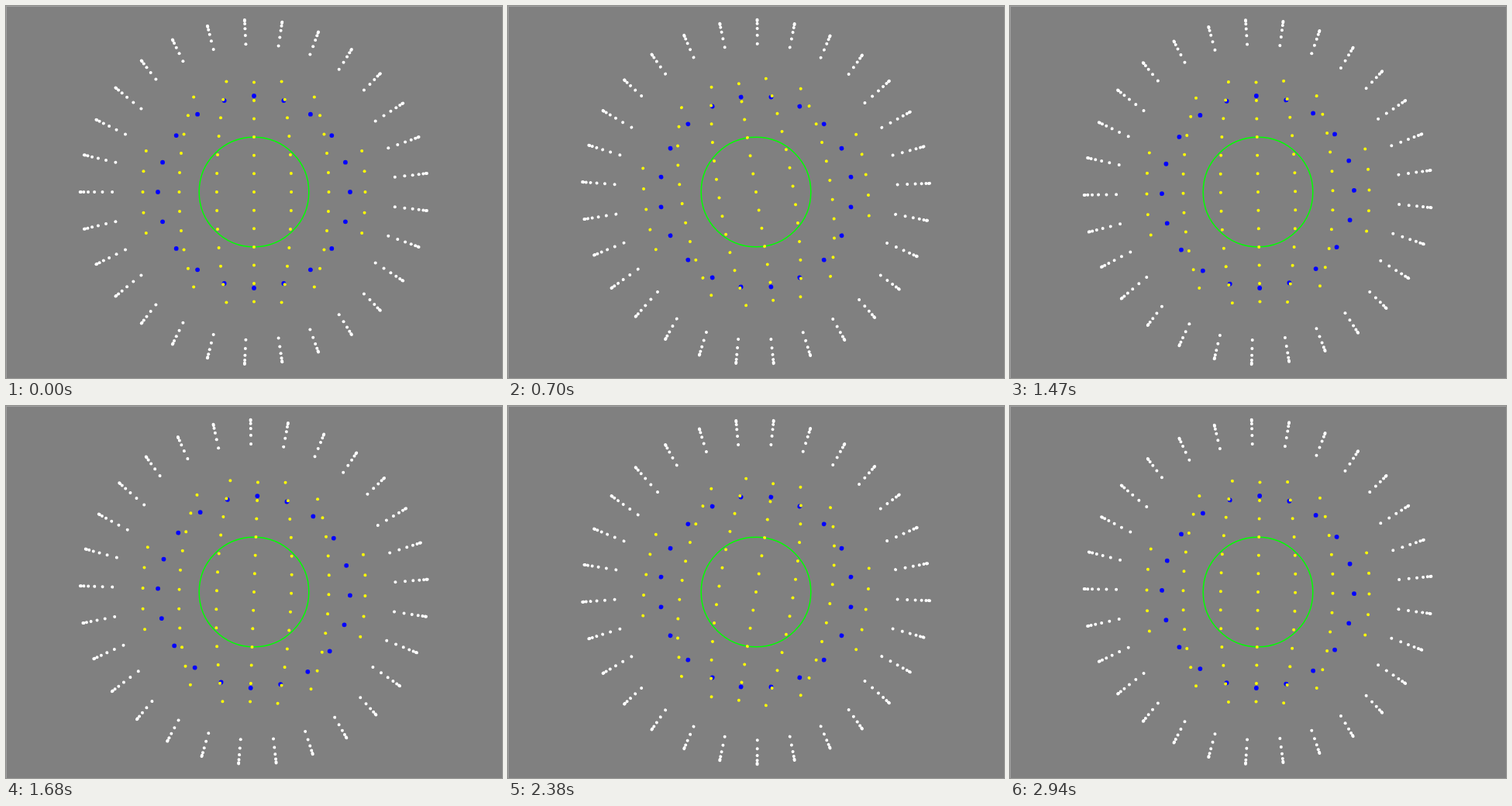
Animation of 640 by 480 pixels, one loop 3.01 s. Source, as an HTML page with a canvas:

```html
<!DOCTYPE html>
<html lang="en">
<head>
<meta charset="utf-8">
<title>Rocking dot field</title>
<style>
html, body { margin: 0; width: 100%; height: 100%; overflow: hidden; background: #808080; }
canvas { display: block; }
</style>
</head>
<body>
<canvas id="stage" width="640" height="480"></canvas>
<script>
const ctx = document.getElementById('stage').getContext('2d');
const TAU = Math.PI * 2;
const STEP = 70, STEPS = 43;

const dot = (x, y, r) => {
  ctx.beginPath();
  ctx.arc(x, y, r, 0, TAU);
  ctx.fill();
};

// Outer spokes: dots crowd together towards the rim; flat spokes have one more.
function spokes() {
  ctx.fillStyle = '#fff';
  for (let k = 0; k < 29; k++) {
    const a = Math.PI - k * TAU / 29;
    const c = Math.cos(a), s = Math.sin(a);
    const first = Math.abs(c) > 0.766 ? 6 : 5;
    for (let n = first; n >= 0; n--) {
      const r = 224.3 - 1.15 * n * n;
      dot(r * c, -r * s * (0.991 - 0.00056 * n * n), 2);
    }
  }
}

function ring() {
  ctx.fillStyle = '#00f';
  for (let k = 0; k < 20; k++) {
    const a = k * TAU / 20;
    dot(124 * Math.cos(a), 124 * Math.sin(a), 2.9);
  }
}

// Curved grid, mirrored about both axes.
const COLUMNS = [0, 48.1, 96.5, 143.5];
const ROWS = [6, 6, 5, 2];

function grid() {
  ctx.fillStyle = '#ff0';
  for (let i = -3; i <= 3; i++) {
    const col = Math.abs(i), rows = ROWS[col];
    for (let j = -rows; j <= rows; j++) {
      const bend = 0.2505 * (1 + 0.0381 * i * i) * (Math.abs(j) / 6) ** 2.2;
      const x = Math.sign(i) * COLUMNS[col] * (1 - bend);
      const y = (23.7 * j - 0.0033 * j ** 3) * (1 + 0.014 * i * i * (1 - 0.013 * j * j));
      dot(x, y, 2);
    }
  }
}

// Whole degrees, rocking to 10 and -10 with a short rest at each turn.
function tilt(time) {
  const s = Math.floor((time % (STEP * STEPS)) / STEP);
  if (s < 12) return Math.max(s - 1, 0);
  return s < 33 ? 22 - s : s - STEPS;
}

function draw(time) {
  ctx.fillStyle = '#808080';
  ctx.fillRect(0, 0, 640, 480);
  ctx.fillStyle = '#a0a0a0';
  ctx.fillRect(0, 0, 640, 1);
  ctx.fillRect(0, 0, 1, 480);

  ctx.save();
  ctx.translate(320, 240);
  ctx.strokeStyle = '#0f0';
  ctx.lineWidth = 1.5;
  ctx.beginPath();
  ctx.arc(0, 0, 70.8, 0, TAU);
  ctx.stroke();
  ctx.rotate(-tilt(time) * Math.PI / 180);
  spokes();
  ring();
  grid();
  ctx.restore();
}

function loop() {
  draw(performance.now());
  requestAnimationFrame(loop);
}
loop();
</script>
</body>
</html>
```
